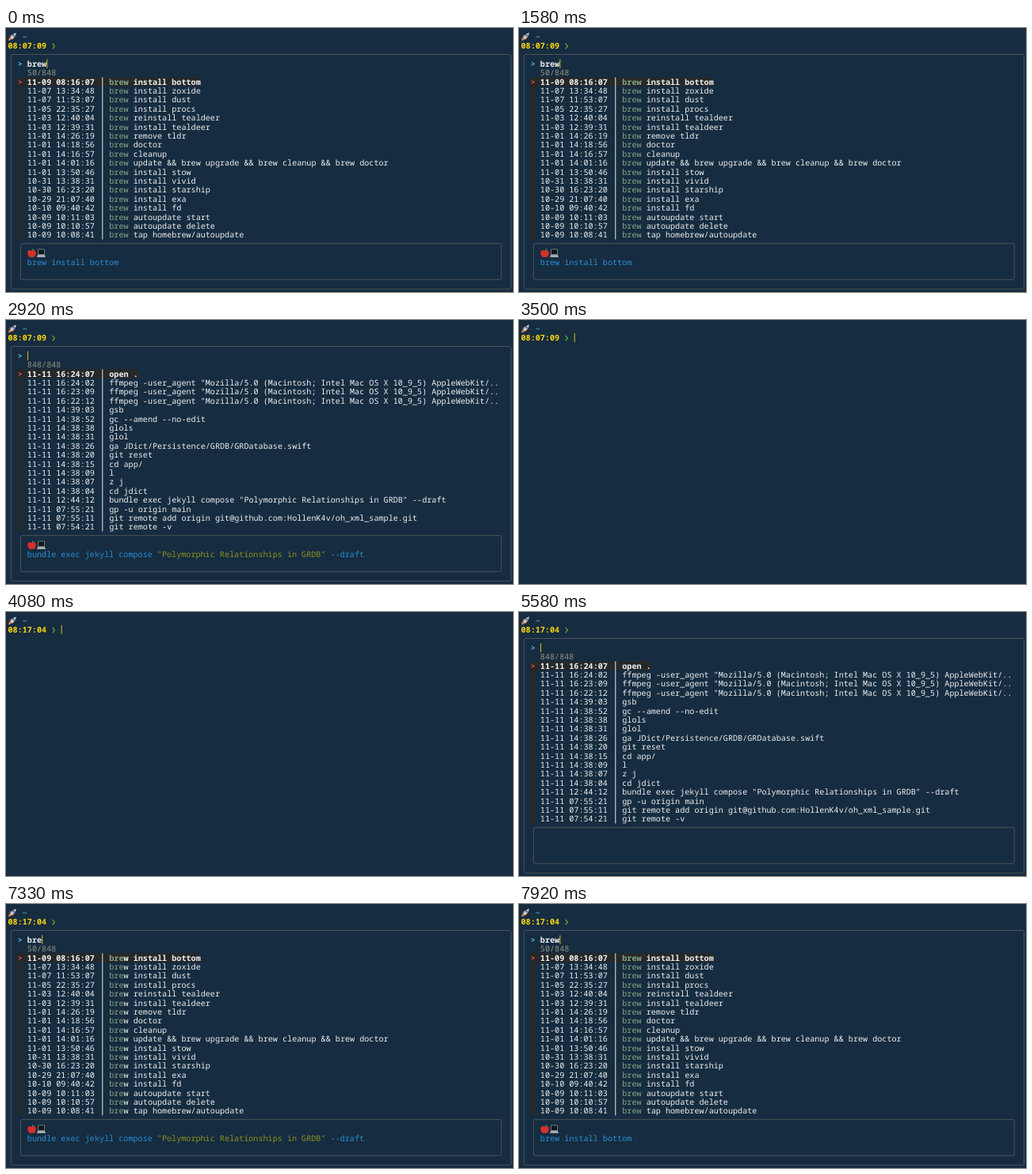
Animation of 640 by 334 pixels, one loop 8 s. Source, as an HTML page:

```html
<!DOCTYPE html>
<html lang="en">
<head>
<meta charset="utf-8">
<title>Shell history search</title>
<style>
  html, body { margin: 0; width: 100%; height: 100%; overflow: hidden; background: #162c40; }
  svg { display: block; width: 640px; height: 334px; }
  text { font: 500 10.142px "Noto Sans Mono", "DejaVu Sans Mono", monospace; white-space: pre;
         text-rendering: geometricPrecision; fill: #eef0f0; }
  .bold { font-weight: 700; }
  .time { fill: #f8d510; }
  .tilde { fill: #35b4d4; }
  .ask { fill: #55b4e2; }
  .count { fill: #92947c; }
  .hit { fill: #83a783; }
  .point { fill: #e2483f; }
  .cmd { fill: #2790d8; }
  .str { fill: #8f9420; }
  .dark { fill: #272829; }
  .cursor { fill: #d8bd1c; }
  .box { fill: none; stroke: #53595b; stroke-width: .9; }
</style>
</head>
<body>
<svg id="stage" viewBox="0 0 640 334"></svg>
<script>
const LOOP = 8000, CELL = 6.085, LINE = 11.4;
const colX = c => 2.5 + c * CELL;
const rowY = r => 11 + r * LINE;      // middle of a text line

const agent = 'ffmpeg -user_agent "Mozilla/5.0 (Macintosh; Intel Mac OS X 10_9_5) AppleWebKit/..';
const bundle = 'bundle exec jekyll compose "Polymorphic Relationships in GRDB" --draft';
const parse = s => s.trim().split('\n').map(l => [l.slice(0, 14), l.slice(15)]);

const recent = parse(`
11-11 16:24:07 open .
11-11 16:24:02 ${agent}
11-11 16:23:09 ${agent}
11-11 16:22:12 ${agent}
11-11 14:39:03 gsb
11-11 14:38:52 gc --amend --no-edit
11-11 14:38:38 glols
11-11 14:38:31 glol
11-11 14:38:26 ga JDict/Persistence/GRDB/GRDatabase.swift
11-11 14:38:20 git reset
11-11 14:38:15 cd app/
11-11 14:38:09 l
11-11 14:38:07 z j
11-11 14:38:04 cd jdict
11-11 12:44:12 ${bundle}
11-11 07:55:21 gp -u origin main
11-11 07:55:11 git remote add origin git@github.com:HollenK4v/oh_xml_sample.git
11-11 07:54:21 git remote -v`);

const brews = parse(`
11-09 08:16:07 brew install bottom
11-07 13:34:48 brew install zoxide
11-07 11:53:07 brew install dust
11-05 22:35:27 brew install procs
11-03 12:40:04 brew reinstall tealdeer
11-03 12:39:31 brew install tealdeer
11-01 14:26:19 brew remove tldr
11-01 14:18:56 brew doctor
11-01 14:16:57 brew cleanup
11-01 14:01:16 brew update && brew upgrade && brew cleanup && brew doctor
11-01 13:50:46 brew install stow
10-31 13:38:31 brew install vivid
10-30 16:23:20 brew install starship
10-29 21:07:40 brew install exa
10-10 09:40:42 brew install fd
10-09 10:11:03 brew autoupdate start
10-09 10:10:57 brew autoupdate delete
10-09 10:08:41 brew tap homebrew/autoupdate`);

// start ms, query (null = picker closed), previewed command
const steps = [
  [0, 'brew', brews[0][1]],
  [2080, 'bre', brews[0][1]],
  [2170, 'br', brews[0][1]],
  [2330, 'b', brews[0][1]],
  [2500, '', brews[0][1]],
  [2580, '', bundle],
  [3000, '', 'open .'],
  [3330, null],
  [5580, '', ''],
  [5670, '', 'open .'],
  [7170, 'b', 'open .'],
  [7250, 'br', 'open .'],
  [7330, 'bre', bundle],
  [7420, 'brew', bundle],
  [7580, 'brew', brews[0][1]],
];

const esc = s => s.replace(/&/g, '&amp;').replace(/</g, '&lt;').replace(/>/g, '&gt;');
const span = (s, cls) => `<tspan class="${cls}">${esc(s)}</tspan>`;
const line = (c, r, inner, cls = '') =>
  `<text x="${colX(c)}" y="${rowY(r) + 3.6}" class="${cls}">${inner}</text>`;
const fill = (x, y, w, h, cls) => `<rect x="${x}" y="${y}" width="${w}" height="${h}" class="${cls}"/>`;
const cursor = (c, r) => fill(colX(c) + .2, rowY(r) - 5.7, 1, LINE, 'cursor');
const frame = (x, y, w, h) => `<rect x="${x}" y="${y}" width="${w}" height="${h}" rx="2" class="box"/>`;

const rocket = `<path d="M3 16l1-4 3 3z" fill="#f08a24"/>
  <path d="M3.5 11l3-2.5 1 2zM8 15.5l2.5-3-2-1z" fill="#d9402f"/>
  <path d="M5 12.5Q7 7.500 13 6Q12 11.500 7 14.500z" fill="#c3cdd3"/>
  <circle cx="9.600" cy="9.400" r="1.200" fill="#2d5878"/>`;

const icons = `<path d="M32.500 282C29 279.500 27 282 27.300 285.300C27.600 288.500 30 291 32.500 289.700C35 291 37.600 288.500 37.800 285.300C38 282 36 279.500 32.500 282z" fill="#d5302c"/>
  <path d="M32.500 282Q32.500 279.500 35 279Q35 281.500 32.500 282z" fill="#4e9c3a"/>
  <path d="M40.500 280h8v6.500h-8z" fill="#10151a" stroke="#87919a" stroke-width=".8"/>
  <path d="M40 287h9l1 3H39z" fill="#a4abb0"/>`;

function listFor(query) {
  if (!query) return recent;
  if (query === 'b') return [...recent.filter(e => e[1][0] === 'b'), ...brews].slice(0, 18);
  return brews;
}

function entry([date, cmd], i, query) {
  const r = 5 + i, n = query.length, cls = i ? '' : 'bold';
  return line(4, r, date, cls) + line(21, r, span(cmd.slice(0, n), 'hit') + esc(cmd.slice(n)), cls);
}

function picker(query, preview) {
  const list = listFor(query);
  const count = { '': 848, b: 187 }[query] || 50;
  const top = rowY(5) - LINE / 2, height = 18 * LINE;
  const code = preview.split(/(".*")/).map((s, i) => span(s, i % 2 ? 'str' : 'cmd')).join('');
  return frame(6.2, 33.5, 631.3, 296.8) + frame(18.4, 272.7, 606.8, 45.6)
    + line(2, 3, '&gt;', 'ask bold') + line(4, 3, query, 'bold') + cursor(4 + query.length, 3)
    + line(4, 4, count + '/848', 'count')
    + fill(colX(2), top, CELL, height, 'dark')
    + fill(colX(2), top, (19 + list[0][1].length) * CELL, LINE, 'dark')
    + `<rect x="121.300" y="${top}" width="1" height="${height}" fill="#e4e8ea"/>`
    + line(2, 5, '&gt;', 'point bold')
    + list.map((e, i) => entry(e, i, query)).join('')
    + (preview && icons + line(4, 25, code));
}

function scene(t) {
  const [, query, preview] = steps.findLast(s => s[0] <= t);
  const clock = t < 4000 ? '08:07:09' : '08:17:04';
  return rocket + line(3, 0, '~', 'tilde bold') + line(0, 1, clock, 'time bold')
    + '<path d="M58.600 19.600L61.400 23L58.600 26.400" fill="none" stroke="#4fb52c" stroke-width="1.200"/>'
    + (query === null ? cursor(11, 1) : picker(query, preview));
}

const stage = document.getElementById('stage');
let shown = '';
function draw() {
  const next = scene(performance.now() % LOOP);
  if (next !== shown) stage.innerHTML = shown = next;
  requestAnimationFrame(draw);
}
draw();
</script>
</body>
</html>
```
